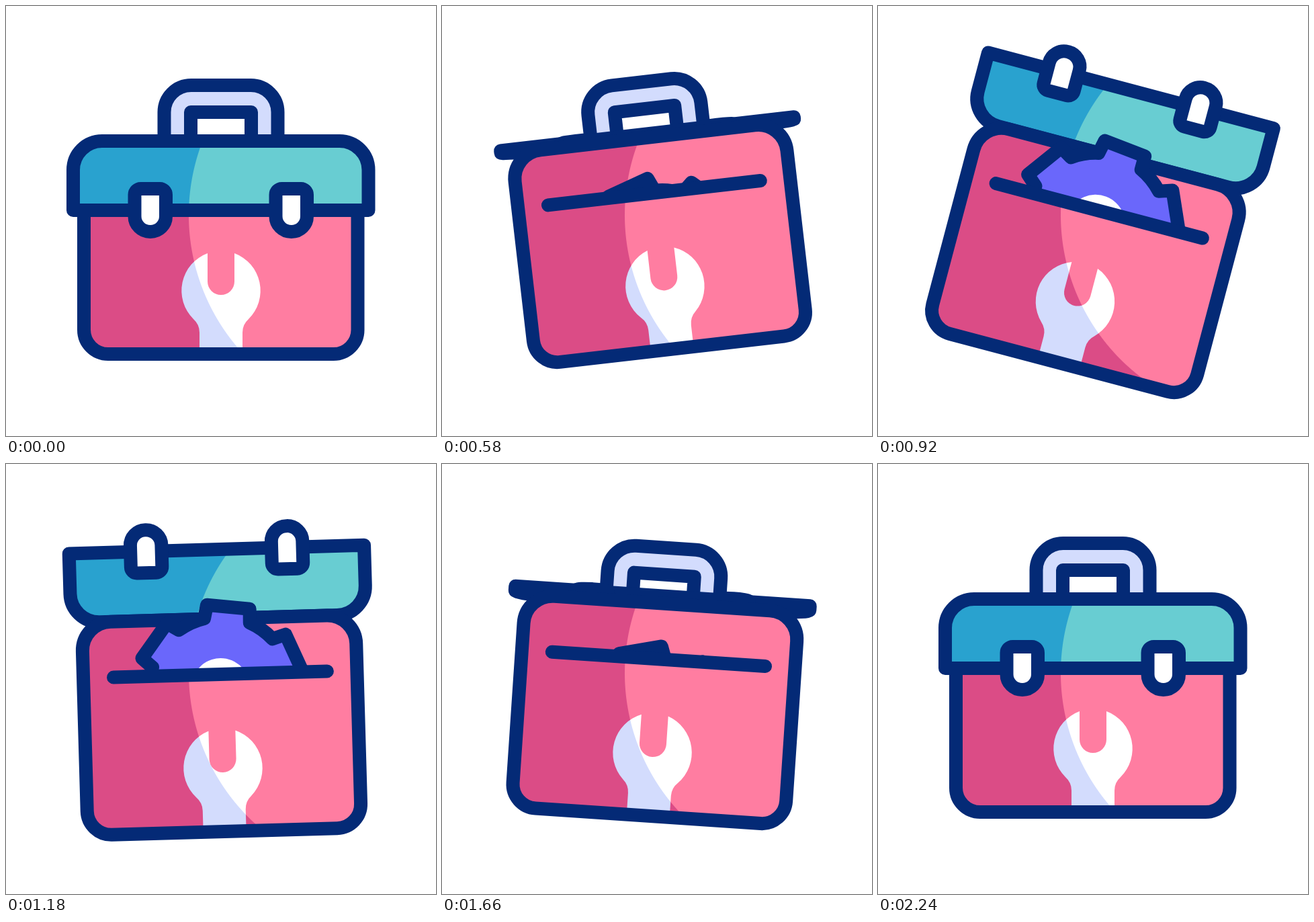
Write an HTML page with a canvas that moves like this. It is 640 px wide and 640 px high and loops after 2.4 s.

```html
<!DOCTYPE html>
<html lang="en">
<head>
<meta charset="utf-8">
<title>Toolbox</title>
<style>
  html, body { margin: 0; height: 100%; overflow: hidden; background: #fff; }
  canvas { display: block; width: 100vmin; height: 100vmin; }
</style>
</head>
<body>
<canvas width="640" height="640"></canvas>
<script>
const ctx = document.querySelector('canvas').getContext('2d');
const LOOP = 2400, HINGE = 201, SLOT = 284;
const NAVY = '#042a76', LILAC = '#d3dcfd', PURPLE = '#6a67fb';

// Keys are [time, value, optional ease-out handle]
const tilt = [[0, 0], [395, -18], [870, 15.6], [1350, -8.5], [1600, 4], [2120, 0]];
const lift = [[0, 0], [400, 53], [716, -44], [1052, 52], [1400, -22], [1790, 16], [2140, 0]];
const lidOpen = [[185, 0], [950, 1], [1338, 1], [2240, 0, .36]];
const gearY = [[185, 478], [950, 304], [1304, 304], [2240, 478, .36]];

// Cubic bezier (1/3, 0, x2, 1)
function ease(u, x2 = 2 / 3) {
  let lo = 0, hi = 1, t;
  for (let i = 0; i < 24; i++) {
    t = (lo + hi) / 2;
    const x = t * (1 - t) ** 2 + 3 * (1 - t) * t * t * x2 + t ** 3;
    if (x < u) lo = t; else hi = t;
  }
  return t * t * (3 - 2 * t);
}

function valueAt(keys, time) {
  const i = keys.findIndex(k => k[0] > time);
  if (i < 0) return keys.at(-1)[1];
  if (i === 0) return keys[0][1];
  const [t0, a] = keys[i - 1], [t1, b, x2] = keys[i];
  return a + (b - a) * ease((time - t0) / (t1 - t0), x2);
}

// The shade edge stays still on the stage while the box moves
function shaded(light, dark) {
  const g = ctx.createRadialGradient(576, 311, 303.5, 576, 311, 304.5);
  g.addColorStop(0, light);
  g.addColorStop(1, dark);
  return g;
}

function box(x, y, w, h, radii) {
  const p = new Path2D();
  p.roundRect(x, y, w, h, radii);
  return p;
}

function gearPath() {
  const p = new Path2D(), rad = Math.PI / 180;
  const point = (r, deg) => p.lineTo(r * Math.sin(deg * rad), -r * Math.cos(deg * rad));
  for (let a = 0; a < 360; a += 60) {
    point(106, a - 18.7);
    point(125, a - 14.8);
    point(125, a + 14.8);
    p.arc(0, 0, 106, (a + 18.7 - 90) * rad, (a + 41.3 - 90) * rad);
  }
  p.closePath();
  return p;
}

const shapes = {
  handle: box(235.5, 118, 169, 83, [40, 40, 0, 0]),
  grip: box(275, 158, 90, 43, 0),
  body: box(116, HINGE, 407.5, 317, [43, 43, 36, 36]),
  lid: box(100, HINGE, 439.5, 103, [43, 43, 0, 0]),
  latches: [191.5, 401.5].map(x => box(x, 272, 46.5, 64, [9, 9, 23, 23])),
  wrench: new Path2D('M300 368A59.4 59.4 0 0 0 279 466Q288 474 288 486V512H352V486Q352 474 361 466A59.4 59.4 0 0 0 340 368V410A20 20 0 0 1 300 410Z'),
  slot: new Path2D(`M161 ${SLOT}H479`),
  aboveSlot: box(0, -300, 640, 300 + SLOT, 0),
  gear: gearPath(),
  hole: new Path2D('M-44 0A44 44 0 1 1 44 0A44 44 0 1 1 -44 0Z')
};

// Paths are transformed first, so the line width never scales
function place(path, matrix) {
  const p = new Path2D();
  p.addPath(path, matrix);
  return p;
}

function paint(path, matrix, fill, outlined = true) {
  const p = place(path, matrix);
  if (fill) {
    ctx.fillStyle = fill;
    ctx.fill(p);
  }
  if (outlined) ctx.stroke(p);
}

function drawLid(base, scale) {
  const m = base.translate(0, HINGE).scale(1, scale, 1).translate(0, -HINGE);
  paint(shapes.lid, m, shaded('#68cdd2', '#29a2cf'));
  for (const latch of shapes.latches) paint(latch, m, '#fff');
}

function drawGear(base, y, angle) {
  const m = base.translate(320, y).rotate(angle);
  ctx.save();
  ctx.clip(place(shapes.aboveSlot, base));
  paint(shapes.gear, m, PURPLE);
  paint(shapes.hole, m, '#fff', false);
  ctx.restore();
}

function draw(time) {
  const base = new DOMMatrix()
    .translate(320, 320 + valueAt(lift, time))
    .rotate(valueAt(tilt, time))
    .translate(-320, -320);
  const open = valueAt(lidOpen, time), scale = 1 - 2 * open;

  ctx.fillStyle = '#fff';
  ctx.fillRect(0, 0, 640, 640);
  ctx.strokeStyle = NAVY;
  ctx.lineWidth = 20;
  ctx.lineJoin = ctx.lineCap = 'round';

  paint(shapes.handle, base, LILAC);
  paint(shapes.grip, base, '#fff');
  if (scale < 0) drawLid(base, scale);
  paint(shapes.body, base, shaded('#ff7da1', '#db4c86'), false);
  paint(shapes.wrench, base, shaded('#fff', LILAC), false);
  paint(shapes.body, base);
  drawGear(base, valueAt(gearY, time), 7 + 180 * (open - 1));
  paint(shapes.slot, base);
  if (scale >= 0) drawLid(base, scale);
}

const start = performance.now();
function tick() {
  draw((performance.now() - start) % LOOP);
  requestAnimationFrame(tick);
}
tick();
</script>
</body>
</html>
```
